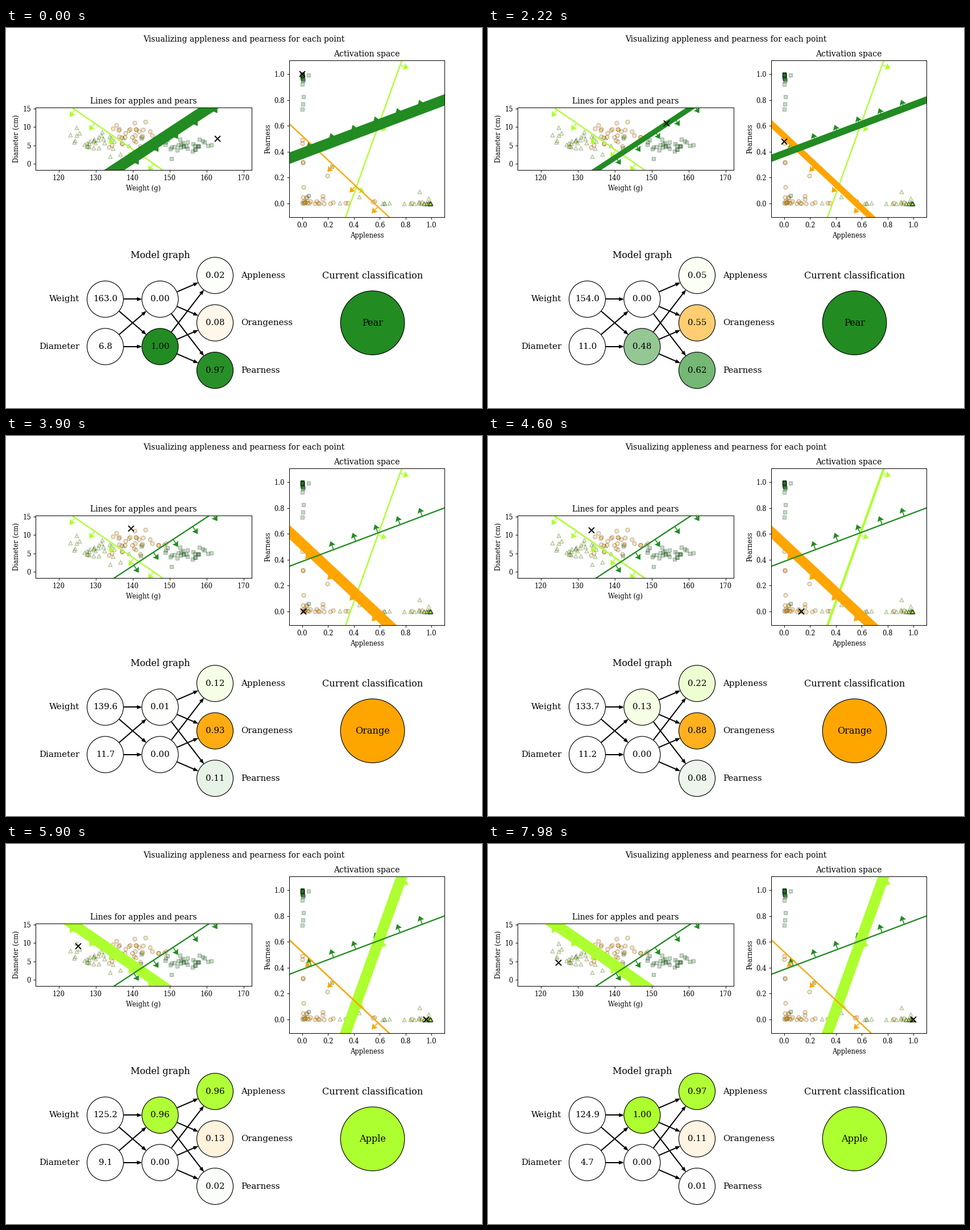
These frames come from a looping animation (837x669 px, 8000 ms). A matplotlib script:

```python
import math

import numpy as np
import matplotlib.pyplot as plt
from matplotlib.animation import FuncAnimation
from matplotlib.collections import PolyCollection
from matplotlib.colors import to_rgb
from matplotlib.patches import Circle, Polygon

W, H = 837, 669
STEP = 20
FRAMES = 400

plt.rcParams["font.family"] = "DejaVu Serif"
plt.rcParams["font.size"] = 10

APPLE, ORANGE, PEAR = "greenyellow", "orange", "forestgreen"
HIDDEN_COLORS = [APPLE, PEAR]
OUTPUT_COLORS = [APPLE, ORANGE, PEAR]
NAMES = ["Apple", "Orange", "Pear"]

# Rows are (x weight, y weight, bias) of one sigmoid neuron.
HIDDEN = np.array([[-0.436, -0.632, 63.53], [0.48, -0.73, -66.014]])
OUTPUT = np.array([[5.38, -1.929, -2.01], [-4.67, -4.99, 2.607], [-2.07, 5.5, -2.125]])

# Fruit clouds: mean and spread of (weight, diameter), colour, marker, size.
CLOUDS = [((130.8, 5.9), (4.0, 1.8), APPLE, "^", 36),
          ((140.3, 7.5), (4.0, 1.6), ORANGE, "o", 36),
          ((153.8, 4.9), (3.9, 1.3), PEAR, "s", 20)]
CLOUD_SIZE = 33

# Axes: pixel box (left, top, right, bottom), pixel of the data zero, pixels per unit.
INPUT_AXES = ((52, 140, 432, 250), (-687.3, 239.3), 6.5)
SPACE_AXES = ((498, 57, 771, 333), (520.75, 308.75), 227.5)

RADIUS = 32


def column(x, count):
    """Centres of one layer of the graph."""
    return [(x, 518.6 + 83.5 * (k - (count - 1) / 2)) for k in range(count)]


INPUT_XY, HIDDEN_XY, OUTPUT_XY = column(174, 2), column(270.5, 2), column(367, 3)


def layer(weights, points):
    points = np.atleast_2d(points)
    return 1 / (1 + np.exp(-(points @ weights[:, :2].T + weights[:, 2])))


def tint(color, amount):
    return tuple(1 - amount * (1 - np.array(to_rgb(color))))


def add_axes(spec):
    (left, top, right, bottom), (x0, y0), scale = spec
    ax = fig.add_axes([left / W, 1 - bottom / H, (right - left) / W, (bottom - top) / H])
    ax.set_xlim((left - x0) / scale, (right - x0) / scale)
    ax.set_ylim((y0 - bottom) / scale, (y0 - top) / scale)
    return ax


def add_stage():
    """Full-size axes measured in pixel centres, y downwards."""
    ax = fig.add_axes([0, 0, 1, 1])
    ax.set_xlim(-0.5, W - 0.5)
    ax.set_ylim(H - 0.5, -0.5)
    ax.axis("off")
    return ax


def directions(weights):
    """Unit vectors across and along the line where a neuron is at one half."""
    normal = weights[:2] / np.hypot(*weights[:2])
    return normal, np.array([-normal[1], normal[0]])


def boundary_arrows(ax, weights, color, count, scale):
    """Small arrows that point to the active side of a boundary."""
    a, b, c = weights
    normal, side = directions(weights)
    half = [(0, 0.8), (8, 0.8), (7, 6), (16, 0)]
    shape = half + [(u, -v) for u, v in half[-2::-1]]
    polys = []
    for x in np.linspace(*ax.get_xlim(), count)[1:-1]:
        base = np.array([x, -(a * x + c) / b])
        polys.append([base + (u * normal + v * side) / scale for u, v in shape])
    ax.add_collection(PolyCollection(polys, facecolors=color, edgecolors="none"),
                      autolim=False)


def boundary_line(ax, weights, color):
    normal, side = directions(weights)
    mid = np.array([np.mean(ax.get_xlim()), np.mean(ax.get_ylim())])
    foot = mid - normal * (mid @ weights[:2] + weights[2]) / np.hypot(*weights[:2])
    reach = np.ptp(ax.get_xlim()) * side
    return ax.plot(*zip(foot - reach, foot + reach), color=color, lw=2)[0]


def connect(stage, start, end):
    p, q = np.array(start, float), np.array(end, float)
    d = (q - p) / np.linalg.norm(q - p)
    side = np.array([-d[1], d[0]])
    p, q = p + d * (RADIUS + 0.5), q - d * (RADIUS + 0.5)
    neck = q - 8 * d
    stage.plot(*zip(p, neck), color="black", lw=1.75, solid_capstyle="butt")
    stage.add_patch(Polygon([q, neck - 3 * side, neck + 3 * side], color="black", lw=0.5))


def add_circle(stage, xy, radius=RADIUS):
    return stage.add_patch(Circle(xy, radius, fc="white", ec="black", lw=1))


def label(stage, xy, text="", size=13, ha="center"):
    return stage.text(*xy, text, size=size, ha=ha, va="center")


def draw_static():
    fig.suptitle("Visualizing appleness and pearness for each point")
    ax1, ax2 = add_axes(INPUT_AXES), add_axes(SPACE_AXES)
    ax1.set(title="Lines for apples and pears", xlabel="Weight (g)", ylabel="Diameter (cm)",
            yticks=range(0, 16, 5))
    ax2.set(title="Activation space", xlabel="Appleness", ylabel="Pearness",
            xticks=np.arange(6) / 5, yticks=np.arange(6) / 5)
    rng = np.random.default_rng(4)
    for mean, spread, color, marker, size in CLOUDS:
        points = rng.normal(mean, spread, (CLOUD_SIZE, 2))
        style = dict(c=color, marker=marker, s=size, alpha=0.27, edgecolors="black", lw=1)
        ax1.scatter(*points.T, **style)
        ax2.scatter(*layer(HIDDEN, points).T, **style)
    for weights, color in zip(HIDDEN, HIDDEN_COLORS):
        boundary_arrows(ax1, weights, color, 12, INPUT_AXES[2])
    for weights, color in zip(OUTPUT, OUTPUT_COLORS):
        boundary_arrows(ax2, weights, color, 8, SPACE_AXES[2])

    stage = add_stage()
    label(stage, (270.5, 399.5), "Model graph", 14)
    label(stage, (644, 436), "Current classification", 14)
    for (_, y), name in zip(INPUT_XY, ["Weight", "Diameter"]):
        label(stage, (128.5, y), name, ha="right")
    for (_, y), name in zip(OUTPUT_XY, NAMES):
        label(stage, (413, y), name + "ness", ha="left")
    for sources, targets in ((INPUT_XY, HIDDEN_XY), (HIDDEN_XY, OUTPUT_XY)):
        for p in sources:
            for q in targets:
                connect(stage, p, q)
    for xy in INPUT_XY:
        add_circle(stage, xy)


fig = plt.figure(figsize=(10.0844, 8.0603), dpi=83)

# Render the fixed parts once and reuse them as a backdrop.
draw_static()
fig.canvas.draw()
backdrop = np.array(fig.canvas.buffer_rgba())
fig.clear()
fig.figimage(backdrop, zorder=-1)

ax1, ax2 = add_axes(INPUT_AXES), add_axes(SPACE_AXES)
for ax in (ax1, ax2):
    ax.patch.set_visible(False)
    ax.set(xticks=[], yticks=[])
lines = [boundary_line(ax1, w, c) for w, c in zip(HIDDEN, HIDDEN_COLORS)]
lines += [boundary_line(ax2, w, c) for w, c in zip(OUTPUT, OUTPUT_COLORS)]
crosses = [ax.plot([0], [0], "x", color="black", ms=9, mew=1.6, zorder=5)[0]
           for ax in (ax1, ax2)]

stage = add_stage()
circles = [add_circle(stage, xy) for xy in HIDDEN_XY + OUTPUT_XY]
verdict = add_circle(stage, (644, 518.6), 56.3)
values = [label(stage, xy) for xy in INPUT_XY + HIDDEN_XY + OUTPUT_XY]
verdict_text = label(stage, (644, 518.6), size=14)


def pose_index(t):
    """Poses last 20, 20 and 100 ms in turn."""
    cycle, rest = divmod(t + 20, 140)
    return 3 * cycle + min(rest // 20, 2) - 1


def update(i):
    angle = math.radians(1.2 * pose_index(i * STEP))
    fruit = np.array([142.96 + 20 * math.cos(angle), 6.8 + 5 * math.sin(angle)])
    hidden = layer(HIDDEN, fruit)[0]
    output = layer(OUTPUT, hidden)[0]
    acts = [*hidden, *output]

    for cross, (x, y) in zip(crosses, (fruit, hidden)):
        cross.set_data([x], [y])
    for line, circle, color, act in zip(lines, circles, HIDDEN_COLORS + OUTPUT_COLORS, acts):
        line.set_linewidth(max(2, 17 * act))
        circle.set_facecolor(tint(color, act))
    shown = [f"{v:.1f}" for v in fruit] + [f"{v:.2f}" for v in acts]
    for text, value in zip(values, shown):
        text.set_text(value)

    best = int(np.argmax(output))
    verdict.set_facecolor(OUTPUT_COLORS[best])
    verdict_text.set_text(NAMES[best])
    return [*lines, *crosses, *circles, *values, verdict, verdict_text]


anim = FuncAnimation(fig, update, frames=FRAMES, interval=STEP,
                     init_func=lambda: update(0), repeat=True, cache_frame_data=False)
plt.show()
```
